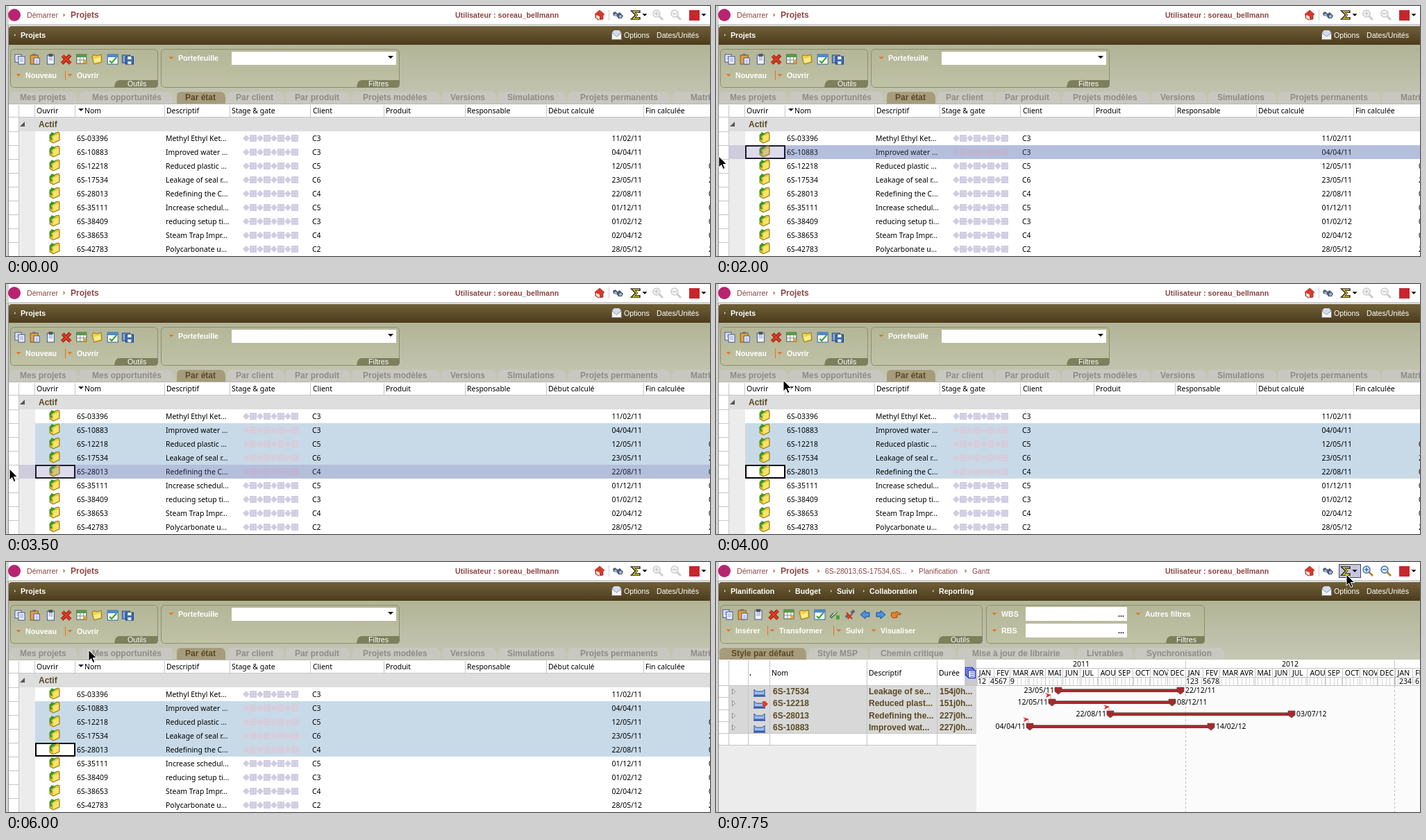
These frames come from a looping animation (1014x361 px, 8000 ms). An HTML page:

```html
<!DOCTYPE html>
<html lang="fr">
<head>
<meta charset="utf-8">
<title>Projets</title>
<style>
html, body { margin: 0; width: 100%; height: 100%; overflow: hidden; background: #fff; }
svg { display: block; width: 1014px; height: 361px; }
text { white-space: pre; font: 10.67px "Liberation Sans", Arial, sans-serif; }
.bold { font-weight: bold; }
.tab { font-size: 12px; font-weight: bold; }
.crumb { font-size: 10.4px; }
.cell { font: 10.45px "Noto Sans", "Open Sans", sans-serif; }
.mid { text-anchor: middle; }
.end { text-anchor: end; }
</style>
</head>
<body>
<svg id="stage" viewBox="0 0 1014 361" xmlns="http://www.w3.org/2000/svg"></svg>
<script>
const LOOP = 8000;
const RED = '#8c4545', BROWN = '#5a4a24', WHITE = '#fff', ORANGE = '#e8711c', EMPTY = '#ececec';

// Drawing helpers; y of a text is its vertical middle.
const text = (x, y, s, cls, fill = '#000') =>
  `<text x="${x}" y="${y + 4}" class="${cls}" fill="${fill}">${s.replace('&', '&amp;')}</text>`;
const rect = (x, y, w, h, fill, more = '') =>
  `<rect x="${x}" y="${y}" width="${w}" height="${h}" fill="${fill}" ${more}/>`;
const path = (d, fill, more = '') => `<path d="${d}" fill="${fill}" ${more}/>`;
const line = (d, color, w = 1, more = '') =>
  path(d, 'none', `stroke="${color}" stroke-width="${w}" ${more}`);
const vline = (x, y1, y2, color = '#c6c6c6') => rect(x, y1, 1, y2 - y1, color);
const hline = (x1, x2, y, color = '#c6c6c6') => rect(x1, y, x2 - x1, 1, color);
const at = (x, y, body) => `<g transform="translate(${x} ${y})">${body}</g>`;
const group = (id, body) => `<g id="${id}">${body}</g>`;
const each = (list, fn) => list.map(fn).join('');
const range = n => [...Array(n).keys()];
const down = (x, y, r, fill) => path(`M${x - r} ${y - r / 2}h${2 * r}l${-r} ${r}z`, fill);
const right = (x, y, r, fill) => path(`M${x - r / 2} ${y - r}v${2 * r}l${r} ${-r}z`, fill);

const sheet = (x, y, w, h) => rect(x, y, w, h, '#f3f6ff', 'stroke="#43549a"') +
  line(`M${x + 2} ${y + 3}h${w - 4}m${4 - w} 2h${w - 4}m${4 - w} 2h${w - 4}`, '#8fa0d4');
const folderShape = path('M-7-3l1-3h4l2 1 6-2 1 11-11 3z', '#f1d34a', 'stroke="#8d761c"') +
  path('M-5 0l10-3 0 6-9 2z', '#fbeb8c');
const lens = sign => color => line('M1 1l6 6', color === '#ccc' ? color : '#b98a2c', 3) +
  `<circle cx="-2" cy="-2" r="5" fill="${color === '#ccc' ? '#f5f5f5' : '#dcebff'}" stroke="${color}" stroke-width="1.5"/>` +
  line(sign, color, 1.6);
const zoomIn = lens('M-5-2h6M-2-5v6'), zoomOut = lens('M-5-2h6');

const icons = {
  copy: sheet(-7, -7, 9, 11) + sheet(-2, -4, 9, 11),
  paste: rect(-7, -6, 11, 13, '#e0a040', 'stroke="#8a5a18"') + rect(-4, -8, 5, 3, '#777') + sheet(-2, -2, 8, 9),
  clip: sheet(-5, -6, 10, 13) + rect(-3, -8, 6, 4, '#555'),
  del: line('M-5-5L6 6M6-6L-6 6', '#8e1a10', 5) + line('M-5-5L6 6M6-6L-6 6', '#e03a22', 3),
  table: rect(-7, -7, 14, 13, WHITE, 'stroke="#4b5b4b"') + rect(-7, -7, 14, 4, '#4ea03c') +
    line('M-7 1h14M-2-7v13M3-7v13', '#7b8b7b') + rect(3, 2, 4, 4, '#e6a020'),
  folder: folderShape,
  chart: rect(-7, -7, 15, 14, WHITE, 'stroke="#2d62a8"') + rect(-7, -7, 15, 4, '#4a8ad4') + line('M-4 2l3 3 7-8', '#39a030', 2),
  save: rect(-8, -6, 11, 11, '#7d9fd2', 'stroke="#28477e"') + rect(-3, -4, 11, 11, '#3f70b8', 'stroke="#1d3767"') +
    rect(0, -4, 5, 4, WHITE) + rect(0, 3, 5, 4, '#dce6f4'),
  link: line('M-6 4l5-5', '#3f5f3f', 4) + line('M-1 0l4-4', '#6b8b6b', 4) + line('M-5 3l7-7', '#d8ecd0', 1.3) + path('M2 1h5v6h-5z', '#45a53c'),
  unlink: line('M-6 4l4-4M2-2l4-4', '#666', 4) + line('M-5-3L3 6M3-1l-6 7', '#d8301e', 2),
  prev: path('M-7 0l7-6v3h6v6h-6v3z', '#4a92e4', 'stroke="#1b4f98"'),
  next: path('M7 0l-7-6v3h-6v6h6v3z', '#4a92e4', 'stroke="#1b4f98"'),
  hand: path('M-6-3h6l1-2 2 2 4 1v2h-5l0 4-6 1-3-3z', '#ec7d20', 'stroke="#a04a10"')
};
const toolRow = (names, xs, y) => each(names.split(' '), (n, i) => at(xs[i], y, icons[n]));

const panel = (x1, x2, label, tabX, labelX) =>
  rect(x1 + .5, 62.5, x2 - x1 - 1, 55, 'url(#panel)', 'rx="5" stroke="#8c8e6c"') +
  path(`M${tabX} 118q1-11 7-11H${x2}v6q0 5-5 5z`, '#7d7f5d') + text(labelX, 112, label, '', WHITE);
const tabs = (list, active) => each(list, ([x1, x2, tx, label], i) =>
  path(`M${x1} 141v-11q0-6 6-6H${x2 - 7}q6 0 7 8v9z`, i === active ? '#a69c7b' : '#c8c8c1') +
  text(tx, 132, label, 'tab', i === active ? BROWN : '#8d8d85'));
const menuLabel = (x, y, s) => down(x - 10, y, 3.5, ORANGE) + text(x, y, s, 'bold', WHITE);
const split = (x, y) => vline(x, y - 7, y + 7, ORANGE);

const topIcons = zoomColor => vline(868, 5, 21, '#d0d0d0') +
  at(855, 13, path('M-7-1L0-7 7-1 5 0v6l-7 1-4-3v-4z', '#d8382c', 'stroke="#8f1f18" stroke-width=".7"') +
    path('M-5 0l5 2v5l-5-3z', '#f4e4dc')) +
  at(881, 13, path('M-7-3l3-2 4 3 3-2 5 5-2 4-5 0-2-3-5-1z', '#4a5a74') +
    '<circle cx="-3" cy="0" r="2" fill="#9db4d4"/><circle cx="4" cy="2" r="2.2" fill="#9db4d4"/>') +
  line('M912 10V8h-9l5 5-5 5h9v-2', '#222', 3.4) + line('M911.5 9V8h-8l5 5-5 5h8v-1', '#d8c820', 1.4) +
  down(920, 13, 3.5, '#000') +
  at(939, 13, zoomIn(zoomColor)) + at(965, 13, zoomOut(zoomColor)) +
  rect(984, 6, 15, 15, '#c8262c') + down(1005, 13, 3.5, '#000');

const frame =
  rect(0, 0, 1014, 361, WHITE) + rect(0, 0, 4, 361, '#d4d4d4') + vline(3, 28, 361, '#8f8f8f') +
  rect(4, 0, 1010, 27, WHITE) + hline(0, 1014, 26, '#e4e4e4') + hline(0, 1014, 27, '#b4b4b4') +
  '<circle cx="12" cy="13" r="9" fill="#b8246f"/>' +
  rect(4, 56, 1010, 85, 'url(#tools)') + path('M4 56V33q0-4 4-4H1014v27z', 'url(#bar)') +
  text(30, 13, 'Démarrer', '', RED) + right(84, 13, 3, '#a89468') + text(93, 13, 'Projets', 'tab', RED) +
  text(647, 13, 'Utilisateur : soreau_bellmann', 'bold', RED) +
  rect(872.5, 38.5, 14, 10, '#f2f2f2', 'stroke="#777"') + path('M873 38l3-3h7l3 3-6 5z', '#cfdcf0') +
  line('M873 39l6.5 5 6.5-5', '#888') +
  text(890, 42, 'Options', '', WHITE) + text(937, 42, 'Dates/Unités', '', WHITE);

const projects = [
  ['6S-03396', 'Methyl Ethyl Ket...', 'C3', '11/02/11', ''],
  ['6S-10883', 'Improved water ...', 'C3', '04/04/11', ''],
  ['6S-12218', 'Reduced plastic ...', 'C5', '12/05/11', '0'],
  ['6S-17534', 'Leakage of seal r...', 'C6', '23/05/11', '2'],
  ['6S-28013', 'Redefining the C...', 'C4', '22/08/11', '0'],
  ['6S-35111', 'Increase schedul...', 'C5', '01/12/11', '0'],
  ['6S-38409', 'reducing setup ti...', 'C3', '01/02/12', '0'],
  ['6S-38653', 'Steam Trap Impr...', 'C4', '02/04/12', '0'],
  ['6S-42783', 'Polycarbonate u...', 'C2', '28/05/12', '2']
];
const gates = (y, fill, inner) => each(range(8), i => at(346 + 10 * i, y, i % 2
  ? rect(-5, -5, 10, 10, fill) + line('M-3-2h2m2 0h2M-3 2h2m2 0h2', inner)
  : path('M-5 0L0-5 5 0 0 5z', fill)));
const openIcon = at(70, 0, path('M-7-4l2-2 5 1 1-2 5-1 1 2v10l-9 4-5-3z', '#e6c32c', 'stroke="#86701a"') +
  path('M-2-2l8-3v8l-8 4z', '#f8e46a') +
  line('M-4 3q-4-5 0-8', '#2f9a2c', 2.5) + path('M-5-8l6 2-5 4z', '#2f9a2c'));

function projectRow([name, title, client, start, end], i) {
  const y = 191 + 20 * i, top = y - 10;
  return gates(y, '#d0cde2', '#e6e4f0') +
    group('sel' + i, rect(42, top, 972, 20, '#c8dae8') + gates(y, '#d6ccdb', '#c8dae8')) +
    group('focus' + i, rect(43, top + 1, 56, 18, WHITE, 'stroke="#000" stroke-width="2"')) +
    at(0, y - 1, openIcon) + text(102, y, name, 'cell') + text(230, y, title, 'cell') + text(441, y, client, 'cell') +
    text(916, y, start, 'cell end') + text(1012, y, end, 'cell') +
    group('hover' + i, rect(19, top, 995, 20, 'rgb(119,107,179)', 'fill-opacity=".25"'));
}

const listPage = group('list',
  topIcons('#ccc') + right(13, 42, 2, '#d8cda8') + text(21, 42, 'Projets', 'bold', WHITE) +
  panel(6, 219, 'Outils', 156, 175) + panel(223, 567, 'Filtres', 505, 522) +
  toolRow('copy paste clip del table folder chart save', range(8).map(i => 20 + 22.2 * i), 77) +
  menuLabel(28, 100, 'Nouveau') + split(85, 100) + menuLabel(102, 100, 'Ouvrir') +
  menuLabel(248, 75, 'Portefeuille') + rect(325, 66, 237, 19, WHITE) + down(554, 74, 4, '#000') +
  tabs([[5, 102, 20, 'Mes projets'], [106, 240, 124, 'Mes opportunités'], [246, 316, 258, 'Par état'],
    [319, 400, 331, 'Par client'], [403, 495, 416, 'Par produit'], [499, 625, 514, 'Projets modèles'],
    [628, 706, 640, 'Versions'], [709, 806, 722, 'Simulations'], [810, 956, 827, 'Projets permanents'],
    [960, 1040, 986, 'Matrice']], 2) +
  rect(4, 141, 1010, 220, WHITE) + hline(4, 1014, 141, '#b8b8b8') + hline(4, 1014, 160) +
  rect(19, 161, 995, 20, '#dedede') + rect(19, 181, 23, 180, EMPTY) +
  each([18, 41, 99, 228, 322, 438, 544, 661, 778, 918], x => vline(x, 143, 160)) +
  vline(18, 160, 361) + each(range(10), i => hline(4, 18, 181 + 20 * i)) +
  each([[44, 'Ouvrir'], [113, 'Nom'], [231, 'Descriptif'], [325, 'Stage & gate'], [442, 'Client'], [547, 'Produit'],
    [664, 'Responsable'], [781, 'Début calculé'], [921, 'Fin calculée']], ([x, s]) => text(x, 151, s, 'cell')) +
  down(108, 150, 4, '#222') + path('M27 167v7h-7z', '#555') + text(47, 171, 'Actif', 'tab', BROWN) +
  each(projects, projectRow) +
  group('menu', rect(82, 112, 220, 130, '#000', 'opacity=".18"') +
    rect(78.5, 108.5, 219, 131, '#f4f4ee', 'stroke="#8c8e6c"') +
    group('item', rect(80, 110, 214, 26, '#d3d3bd')) +
    each(['Planification', 'Budget', 'Suivi', 'Collaboration', 'Reporting'], (s, i) => text(104, 123 + 26 * i, s, '', BROWN))));

// Gantt time scale: days from 1 January 2011 to pixels.
const dayX = d => 375.8 + d * 301 / 365;
const dayOf = s => {
  const [d, m, y] = s.split('/').map(Number);
  return (Date.UTC(2000 + y, m - 1, d) - Date.UTC(2011, 0, 1)) / 864e5;
};
const tasks = [
  ['6S-17534', 'Leakage of se...', '154j0h...', '23/05/11', '22/12/11'],
  ['6S-12218', 'Reduced plast...', '151j0h...', '12/05/11', '08/12/11'],
  ['6S-28013', 'Redefining the...', '227j0h...', '22/08/11', '03/07/12'],
  ['6S-10883', 'Improved wat...', '227j0h...', '04/04/11', '14/02/12']
];
const months = 'JAN FEV MAR AVR MAI JUN JUL AOU SEP OCT NOV DEC'.split(' ');
const marker = path('M-5-4H5V2L0 6-5 2z', '#a52a2e', 'stroke="#6e3a3a" stroke-width=".7"');

function taskRow([name, title, span, start, end], i) {
  const y = Math.round(187 + 17.4 * i), by = Math.round(185 + 17.2 * i);
  const x1 = Math.round(dayX(dayOf(start))), x2 = Math.round(dayX(dayOf(end)));
  return path(`M23.5 ${y - 4}v8l4-4z`, '#e8e8e8', 'stroke="#8a8a8a"') +
    at(62, y + 2, path('M-7-5v8H8v-8l-3 3h-9z', '#9cc0f2', 'stroke="#24489c"') + line('M-8 4.5H9', '#24489c', 2)) +
    (i === 1 ? path(`M67 ${y - 3}l4 0 4 4-4 4-4 0z`, '#e0402c') : '') +
    text(82, y, name, 'tab', BROWN) + text(220, y, title, 'tab', BROWN) + text(322, y, span, 'tab', BROWN) +
    rect(x1, by - 1, x2 - x1, 4, '#a52a2e') + hline(x1, x2, by - 2, '#8c7a70') +
    at(x1, by, marker) + at(x2, by, marker) +
    (i ? path(`M${x1 - 10} ${by - 13}l9 3-8 4 2-4z`, '#e8262c') + line(`M${x1 - 2} ${by - 9}v5`, '#c8a0a0') : '') +
    text(x1 - 6, by, start, 'cell end') + text(x2 + 7, by, end, 'cell');
}

const ganttPage = group('gantt',
  each([[157, '6S-28013,6S-17534,6S...'], [292, 'Planification'], [369, 'Gantt']],
    ([x, s]) => right(x - 9, 13, 3, '#a89468') + text(x, 13, s, 'crumb', RED)) +
  group('button', rect(897.5, 3.5, 31, 19, '#c6c6de', 'stroke="#44445c"')) + topIcons('#3f70b8') +
  each([[21, 'Planification'], [114, 'Budget'], [174, 'Suivi'], [221, 'Collaboration'], [321, 'Reporting']],
    ([x, s]) => right(x - 8, 42, 2, '#d8cda8') + text(x, 42, s, 'bold', WHITE)) +
  panel(6, 384, 'Outils', 320, 338) + panel(389, 704, 'Filtres', 648, 663) +
  toolRow('copy paste clip del table folder chart link unlink prev next hand', range(12).map(i => 17 + 22 * i), 76) +
  menuLabel(28, 99, 'Insérer') + split(74, 99) + menuLabel(91, 99, 'Transformer') + split(169, 99) +
  menuLabel(187, 99, 'Suivi') + menuLabel(237, 99, 'Visualiser') +
  each([['WBS', 75], ['RBS', 99]], ([s, y]) => menuLabel(411, y, s) + rect(446, y - 10, 146, 20, WHITE) + text(579, y, '...', 'bold')) +
  menuLabel(618, 75, 'Autres filtres') +
  tabs([[5, 130, 22, 'Style par défaut'], [134, 218, 146, 'Style MSP'], [222, 345, 237, 'Chemin critique'],
    [349, 516, 369, 'Mise à jour de librairie'], [520, 600, 534, 'Livrables'], [604, 732, 620, 'Synchronisation']], 0) +
  rect(4, 141, 371, 220, EMPTY) + rect(4, 141, 371, 124, WHITE) + rect(19, 179, 356, 68, '#d8d8d8') +
  each([18, 46, 77, 217, 318], x => vline(x, 142, 265)) + rect(358, 141, 17, 37, '#c9c9cd') +
  each([178, 195, 213, 230, 247, 264], y => hline(4, y === 178 || y > 246 ? 375 : 18, y)) +
  text(48, 160, '.', 'bold') + text(80, 160, 'Nom', 'cell') + text(220, 160, 'Descriptif', 'cell') + text(321, 160, 'Durée', 'cell') +
  each(range(3), i => rect(359.5 + 2 * i, 152.5 + 2 * i, 10, 11, WHITE, 'stroke="#2030c8" stroke-width="1.4"')) +
  line('M366 159h6m-6 3h6m-6 3h6', '#2030c8') +
  rect(375, 141, 639, 220, WHITE) + rect(375, 179, 639, 182, '#fbfbfb') +
  hline(375, 1014, 153) + hline(375, 1014, 166) + hline(375, 1014, 178) +
  each(range(111), i => vline(Math.round(dayX(7 * i)), 167, 178, '#d6d6d6')) +
  each(range(26), i => {
    const x = dayX((Date.UTC(2011, i, 1) - Date.UTC(2011, 0, 1)) / 864e5);
    return vline(Math.round(x) - 1, 154, 178) + text(x + 3, 160, months[i % 12], 'cell');
  }) +
  text(526, 147, '2011', 'cell mid') + text(827, 147, '2012', 'cell mid') +
  each([[377, '12'], [395, '4567'], [424, '9'], [677, '123'], [701, '5678'], [984, '234'], [1007, '67']],
    ([x, s]) => rect(x, 168, 6 * s.length, 10, WHITE) + text(x, 172, s, 'cell')) +
  each([676.5, 977.5], x => line(`M${x} 142V178`, '#c6c6c6') + line(`M${x} 179V361`, '#bcbcbc', 1, 'stroke-dasharray="3 3"')) +
  each(tasks, taskRow));

const gradient = (id, a, b) =>
  `<linearGradient id="${id}" x2="0" y2="1"><stop stop-color="${a}"/><stop offset="1" stop-color="${b}"/></linearGradient>`;
document.getElementById('stage').innerHTML =
  `<defs>${gradient('bar', '#6f6038', '#4c3b1c')}${gradient('tools', '#b2b496', '#c6c7b5')}${gradient('panel', '#b4b698', '#c0c2a5')}</defs>` +
  frame + listPage + ganttPage +
  group('cursor', path('M0 0V16L3.7 12.6 6.3 18.6 9 17.4 6.4 11.6H11.5z', '#000', 'stroke="#fff"'));

// Hard steps, all tied to the document clock.
function play(id, frames) {
  const keys = frames.map(([time, style]) => ({ offset: time / LOOP, easing: 'step-end', ...style }));
  keys.push({ ...keys[keys.length - 1], offset: 1 });
  document.getElementById(id).animate(keys, { duration: LOOP, iterations: Infinity }).startTime = 0;
}
function show(id, ...spans) {
  const frames = spans.flatMap(([from, to = LOOP]) => [[from, { opacity: 1 }], [to, { opacity: 0 }]]);
  if (!frames.length || frames[0][0] > 0) frames.unshift([0, { opacity: 0 }]);
  play(id, frames.filter(([time]) => time < LOOP));
}

const selected = { 1: [2000], 2: [3500], 3: [3500], 4: [3500] };
const focused = { 1: [2000, 3500], 4: [3500] };
const hovered = { 1: [2000, 2500], 3: [2500, 2750], 4: [2750, 4000] };
projects.forEach((_, i) => {
  for (const [name, spans] of [['sel', selected], ['focus', focused], ['hover', hovered]])
    show(name + i, ...(spans[i] ? [spans[i]] : []));
});
show('list', [0, 6500]);
show('gantt', [6500]);
show('menu', [5000, 6000]);
show('item', [5250, 6000]);
show('button', [7750]);

const stops = [
  [0, -40, -40], [250, 135, 95], [500, 65, 135], [750, 23, 197], [1000, 5, 208], [1250, 4, 217],
  [2500, 2, 249], [2750, 5, 267], [4000, 97, 139], [4250, 101, 119], [4500, 122, 96], [5250, 113, 116],
  [5500, 119, 127], [7000, 307, 122], [7250, 691, 92], [7500, 787, 79], [7750, 908, 18]
];
play('cursor', stops.map(([time, x, y]) => [time, { transform: `translate(${x}px, ${y}px)` }]));
</script>
</body>
</html>
```
